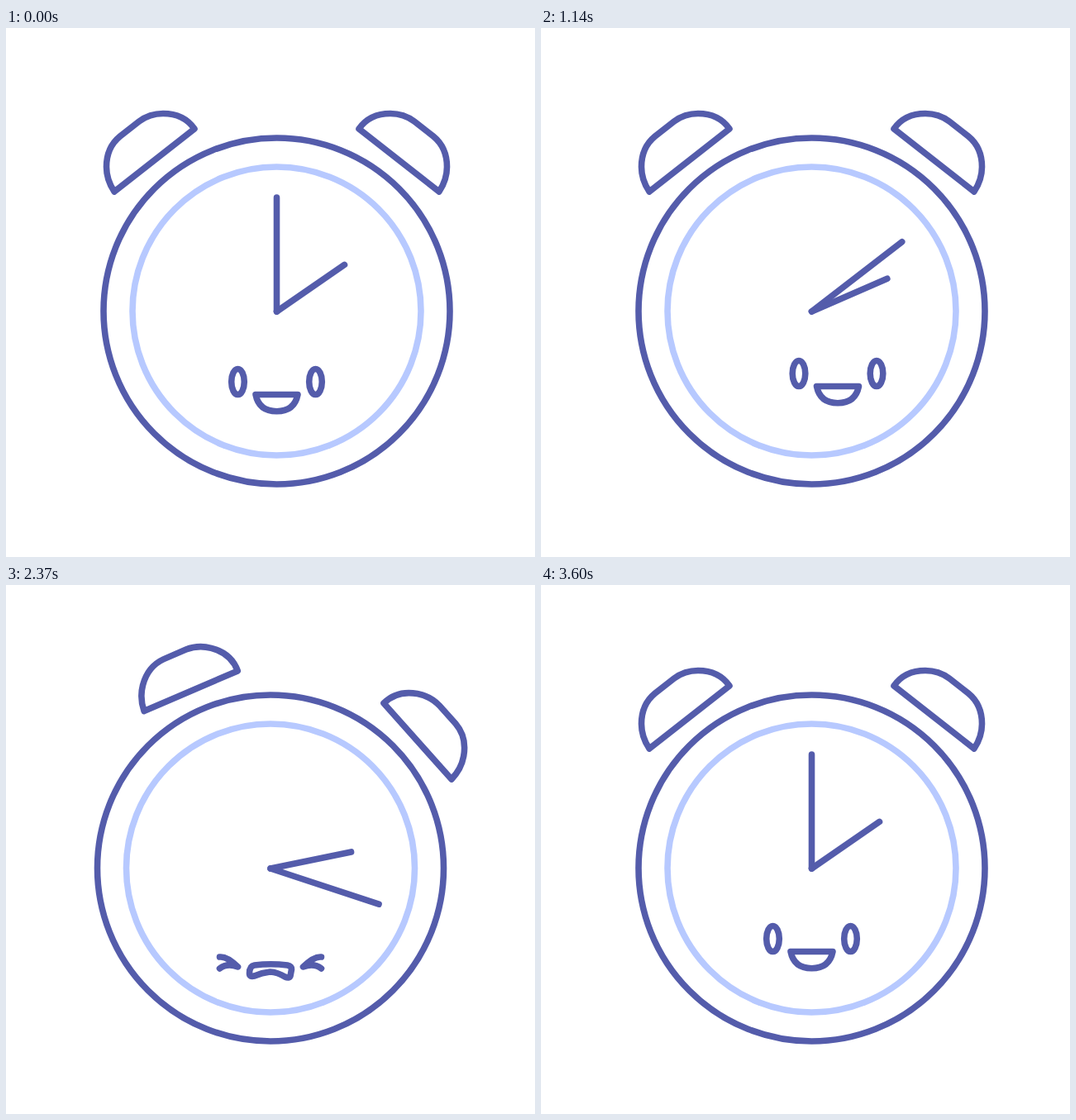
An HTML page that plays this animation: 640x640 px, repeating every 3630 ms.

```html
<!DOCTYPE html>
<html lang="en">
<head>
<meta charset="utf-8">
<title>Alarm clock</title>
<style>
  html, body { margin: 0; width: 100%; height: 100%; overflow: hidden; background: #fff; }
  svg { display: block; width: 100vw; height: 100vh; }
</style>
</head>
<body>
<svg viewBox="0 0 640 640" fill="none" stroke="#545cab" stroke-width="7.6" stroke-linecap="round" stroke-linejoin="round">
  <defs>
    <path id="bell" d="M131 198L228 122C219 109 205 103.5 190 103.5C179 103.5 169 107 161 113L138 131C127 140 121.5 153 121.5 168C121.5 178 125 189 131 198Z"/>
    <path id="squint" d="M266 450Q275 449 288 462Q275 457 266 464"/>
  </defs>
  <g id="clock">
    <g id="left"><use href="#bell"/></g>
    <g id="right"><use href="#bell" transform="matrix(-1 0 0 1 655 0)"/></g>
    <circle cx="327.5" cy="342.5" r="209.5"/>
    <circle cx="327.5" cy="342.5" r="174.5" stroke="#b7c9ff"/>
    <path id="minute" d="M327.5 343V205"/>
    <path id="hour" d="M327.5 343V243.4"/>
    <g id="happy">
      <ellipse cx="280.5" cy="428" rx="7.8" ry="15.5"/>
      <ellipse cx="374.5" cy="428" rx="7.8" ry="15.5"/>
      <path id="smile" d="M302 443.5H353Q349 463.7 327.5 463.7Q306 463.7 302 443.5Z"/>
    </g>
    <g id="upset">
      <use href="#squint"/>
      <use href="#squint" transform="matrix(-1 0 0 1 655 0)"/>
      <path d="M308 460Q328 457.5 348 460Q353 461 353 465L351.500 473Q350 476.500 345 474Q336 468.500 327 468Q317 469 308 473Q302 474.500 302 470Q302 461 308 460Z"/>
    </g>
  </g>
</svg>
<script>
const STEP = 30, LOOP = 3630, CX = 327.5, CY = 343;
const RING_START = 66, RING_END = 107;
const el = id => document.getElementById(id);
const clock = el('clock'), left = el('left'), right = el('right');
const minute = el('minute'), hour = el('hour');
const happy = el('happy'), upset = el('upset'), smile = el('smile');

// Eased interpolation through [tick, value] keys
function track(keys, t) {
  if (t <= keys[0][0]) return keys[0][1];
  for (let i = 1; i < keys.length; i++) {
    const [t0, a] = keys[i - 1], [t1, b] = keys[i];
    if (t <= t1) {
      const p = (t - t0) / (t1 - t0);
      return a + (b - a) * p * p * (3 - 2 * p);
    }
  }
  return keys[keys.length - 1][1];
}

// Bell swing: ten alternating beats, four ticks each
function swingKeys(start) {
  const keys = [[start, 0]];
  for (let i = 1; i <= 10; i++) keys.push([start + i * 4, i % 2 ? 14.8 : -14.8]);
  keys.push([start + 44, 0]);
  return keys;
}

const rightSwing = swingKeys(66), leftSwing = swingKeys(67);
const turn = [[6.3, 0], [75, 1], [97.3, 0]];
const lookX = [[2, 0], [12, -28.5], [23, -28.5], [35, 31.5], [44, 31.5], [55, 0]];
const lookY = [[2, 0], [12, -30], [23, -30], [35, -10], [44, -10], [55, 0]];
const sway = [[3, 0], [6, -13], [10, 13], [13, 0]];

function shift(t) {
  if (t < 60) return track(sway, t % 20);
  if (t < 69 || t >= RING_END) return 0;
  return -7.5 * Math.cos((t - 71) * Math.PI * 0.75);
}

const move = (node, x, y) => node.setAttribute('transform', `translate(${x} ${y})`);
const spin = (node, a) => node.setAttribute('transform', `rotate(${a} ${CX} ${CY})`);
const show = (node, on) => node.setAttribute('visibility', on ? 'visible' : 'hidden');

function draw(ms) {
  const t = Math.floor((ms % LOOP) / STEP);
  const ringing = t >= RING_START && t < RING_END;
  const k = track(turn, t);
  move(clock, shift(t), 0);
  spin(left, track(leftSwing, t));
  spin(right, track(rightSwing, t));
  spin(minute, 118.3 * k);
  spin(hour, 55.4 + 25.1 * k);
  move(happy, track(lookX, t), track(lookY, t));
  const open = t < RING_END ? 1 : track([[RING_END, 0.5], [112, 1]], t);
  smile.setAttribute('transform', `translate(0 443.5) scale(1 ${open}) translate(0 -443.5)`);
  show(happy, !ringing);
  show(upset, ringing);
}

let begin = null;
function tick(now) {
  if (begin === null) begin = now;
  draw(now - begin);
  requestAnimationFrame(tick);
}
draw(0);
requestAnimationFrame(tick);
</script>
</body>
</html>
```
